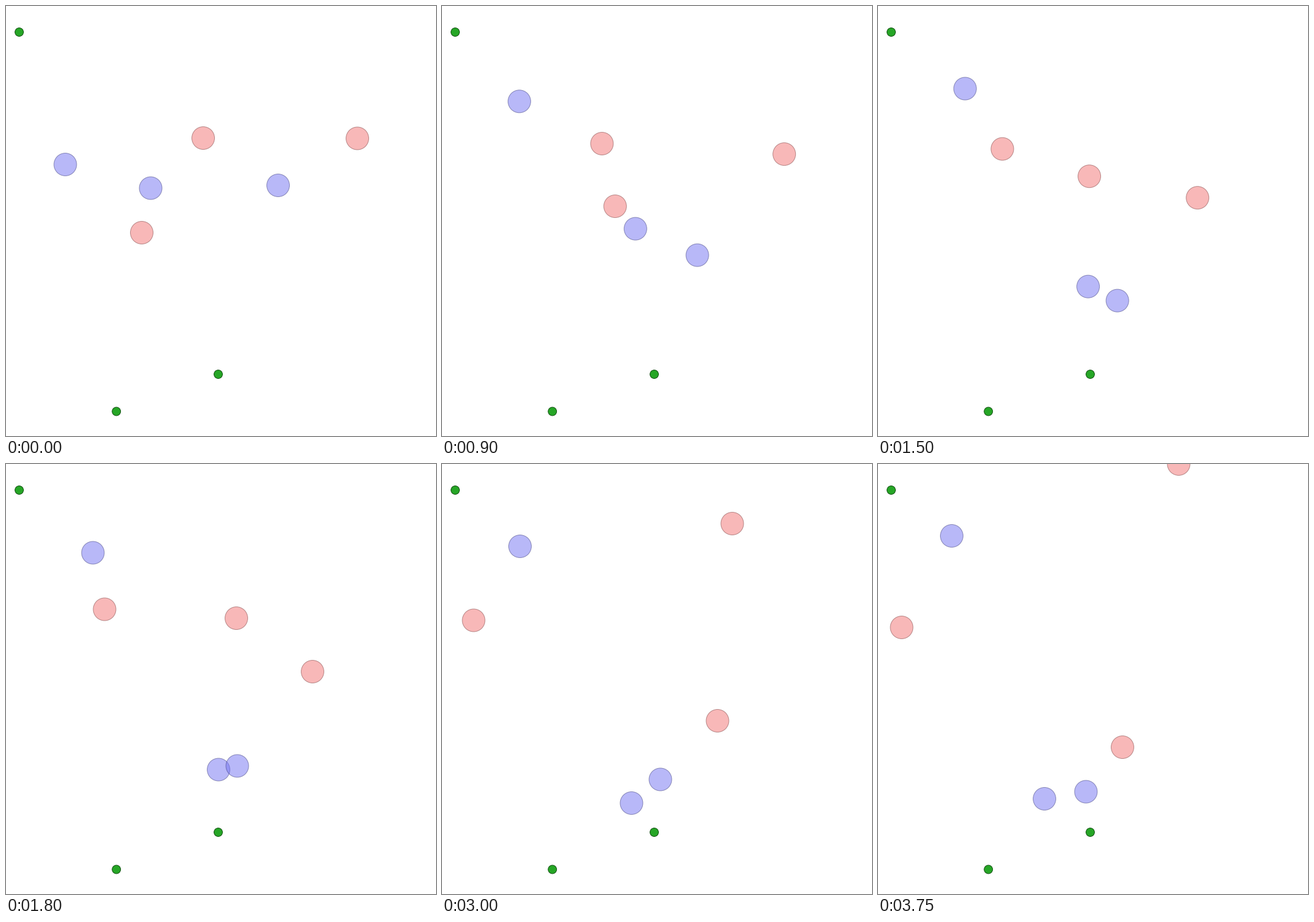
Animation of 700x700 px, one loop 3.9 s. Source, as a matplotlib script:

```python
import numpy as np
import matplotlib.pyplot as plt
from matplotlib.animation import FuncAnimation
from matplotlib.patches import Circle

SIZE, DPI = 700, 100
FRAMES, STEP_MS = 26, 150
KNOTS = [0, 4, 8, 12, 16, 20, 25]

BLUE = (0.45, 0.45, 0.95)
RED = (0.95, 0.45, 0.45)
GREEN = (0.15, 0.65, 0.15)

LANDMARKS = [(21.5, 42.5), (345.5, 599.5), (179.7, 660)]

# colour, x at KNOTS, y at KNOTS, extra x knots, extra y knots
AGENTS = [
    (RED, [321, 279.5, 236.5, 160.5, 86, 51.5, 38.5],
     [215, 220, 228.5, 236.5, 244.5, 254.5, 266],
     {14: 117.5, 21: 48.5}, {}),
    (RED, [572, 560, 542.5, 499, 472.5, 448.5, 398],
     [215.5, 208, 282.5, 338, 397.5, 418, 461],
     {7: 552, 14: 483}, {}),
    (RED, [221, 255.5, 312.5, 375, 431.5, 472.5, 489.5],
     [369, 347.5, 301, 251, 182, 97, 0],
     {}, {21: 69.5}),
    (BLUE, [96.5, 112.5, 137.5, 141.5, 138, 127, 120],
     [258, 182.5, 138.5, 144.5, 148, 134, 117],
     {}, {7: 145.5, 10: 134.5}),
    (BLUE, [235.5, 295.5, 329.5, 346, 322.5, 308.5, 271],
     [296.5, 325, 410, 497.5, 545, 552, 545],
     {}, {14: 528, 18: 554, 21: 550}),
    (BLUE, [443, 426, 403.5, 376.5, 360, 355.5, 338.5],
     [292, 366.5, 451.5, 491.5, 509.5, 513.5, 533.5],
     {}, {7: 428}),
]


def spline(values, extra):
    """Natural cubic spline through the knots, sampled at every frame."""
    points = sorted({**dict(zip(KNOTS, values)), **extra}.items())
    t, p = np.array(points, float).T
    h = np.diff(t)
    slope = np.diff(p) / h
    n = len(t)
    a, b = np.eye(n), np.zeros(n)
    for i in range(1, n - 1):
        a[i, i - 1:i + 2] = h[i - 1], 2 * (h[i - 1] + h[i]), h[i]
        b[i] = 6 * (slope[i] - slope[i - 1])
    m = np.linalg.solve(a, b)
    s = np.arange(FRAMES)
    k = np.clip(np.searchsorted(t, s, side="right") - 1, 0, n - 2)
    d = s - t[k]
    start = slope[k] - h[k] * (2 * m[k] + m[k + 1]) / 6
    return p[k] + d * start + d**2 * m[k] / 2 + d**3 * (m[k + 1] - m[k]) / (6 * h[k])


fig = plt.figure(figsize=(SIZE / DPI, SIZE / DPI), dpi=DPI, facecolor="white")
ax = fig.add_axes([0, 0, 1, 1])
ax.set_xlim(0, SIZE)
ax.set_ylim(SIZE, 0)
ax.axis("off")


def add_disc(center, radius, color, alpha):
    edge = tuple(c / 2 for c in color)
    disc = Circle(center, radius, facecolor=(*color, alpha),
                  edgecolor=(*edge, alpha), linewidth=72 / DPI)
    return ax.add_patch(disc)


for spot in LANDMARKS:
    add_disc(spot, 6.9, GREEN, 1)

discs = [add_disc((0, 0), 18.5, agent[0], 0.5) for agent in AGENTS]
paths = [np.column_stack([spline(x, more_x), spline(y, more_y)])
         for _, x, y, more_x, more_y in AGENTS]


def update(frame):
    for disc, path in zip(discs, paths):
        disc.center = tuple(path[frame])
    return discs


anim = FuncAnimation(fig, update, frames=FRAMES, interval=STEP_MS,
                     repeat=True, repeat_delay=0, blit=False)
plt.show()
```
